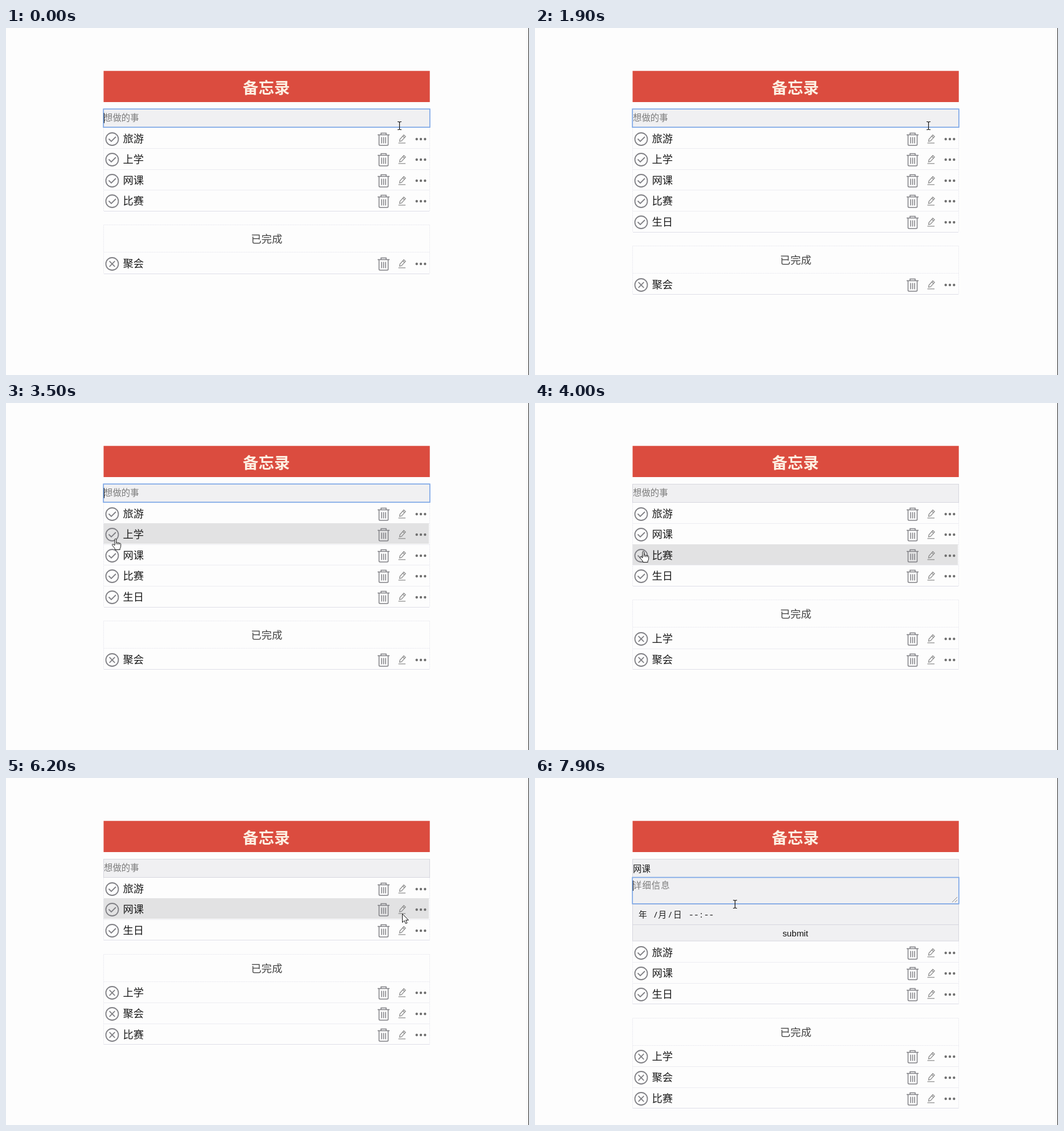
These frames come from a looping animation (919 px wide and 609 px high, 8000 ms). An HTML page:

```html
<!DOCTYPE html>
<html lang="zh-CN">
<head>
<meta charset="utf-8">
<title>备忘录</title>
<style>
  html, body { margin: 0; width: 100%; height: 100%; overflow: hidden; background: #fdfdfd; }
  svg { display: block; width: 919px; height: 609px; }
  text { font-family: "Noto Sans CJK SC", "Noto Sans CJK", "Noto Sans", sans-serif; white-space: pre; }
  .title { font-size: 27.6px; font-weight: 700; fill: #fdf0e2; text-anchor: middle; }
  .item { font-size: 18.4px; font-weight: 350; fill: #1c1c1c; }
  .done { font-size: 18.4px; font-weight: 350; fill: #444; text-anchor: middle; }
  .field { font-size: 15.4px; font-weight: 350; fill: #1c1c1c; }
  .hint { fill: #7c7c7c; }
  .mono { font-family: "Noto Sans Mono", "Noto Sans CJK SC", monospace; font-size: 14.8px; }
  .button { font-family: "Liberation Sans", sans-serif; font-size: 15.3px; fill: #111; text-anchor: middle; }
  .box { fill: #f0f0f2; stroke: #d6d6de; }
  .focus { fill: none; stroke: #7ba6e6; stroke-width: 1.7; }
  .rule { fill: none; stroke: #ececf1; stroke-width: 1; }
  .end { stroke: #dedee8; }
  .frame { fill: none; stroke: #e8e8ef; stroke-dasharray: 2 1; }
  .icon { fill: none; stroke: #7f7f84; stroke-width: 1.8; }
  .thin { fill: none; stroke: #8a8a8a; stroke-width: 1.3; }
  .caret { stroke: #111; stroke-width: 1; }
  .pointer { fill: #fff; stroke: #111; stroke-width: 1; stroke-linejoin: round; }
  .beam { fill: none; stroke: #111; stroke-width: 1.2; }
</style>
</head>
<body>
<svg viewBox="0 0 919 609" xmlns="http://www.w3.org/2000/svg">
  <defs>
    <g id="ring"><circle class="icon" cx="186.5" cy="20" r="11"/></g>
    <path id="check" class="icon" d="M180.5 19.5L185 24L193 16"/>
    <path id="cross" class="icon" d="M181.7 15.2L191.3 24.8M191.3 15.2L181.7 24.8"/>
    <g id="tools">
      <path class="icon" style="stroke-width:1.5" d="M653 12.5H674M659 12.5V9.5H668V12.5M655.5 13V29.5Q655.5 31 657.5 31H669.5Q671.5 31 671.5 29.5V13M660 16.5V27.5M663.5 16.5V27.5M667 16.5V27.5"/>
      <path class="thin" d="M691.5 24L692.2 20.3L699 12.8L702 15.6L695 23.2ZM697.2 14.8L700.2 17.6M689.5 26.8H702"/>
      <g fill="#707070">
        <circle cx="721.7" cy="20" r="2.2"/>
        <circle cx="729" cy="20" r="2.2"/>
        <circle cx="736.3" cy="20" r="2.2"/>
      </g>
    </g>
    <path id="arrow" class="pointer" d="M.5 .5V15.5L4 12.3L6.4 17.6L8.8 16.5L6.5 11.4H11.2Z"/>
    <path id="hand" class="pointer" d="M0 1.2Q1.4 -.8 2.8 1.2V7.2Q4.3 5.9 5.5 7.5Q7 6.5 8.1 8.2Q10.2 7.4 10.7 9.5V13.5Q10.5 16 9.2 17.2V19.5H.6V17.8L-4.4 11.6Q-4.6 9.2 -2.2 10L0 12ZM2.8 7.2V10M5.5 7.5V10.3M8.1 8.2V10.6"/>
    <path id="beam" class="beam" d="M-3 -6.5H-.8L.5 -5.5L1.8 -6.5H4M.5 -5.5V6.5M-3 7.5H-.8L.5 6.5L1.8 7.5H4"/>
  </defs>
  <rect width="919" height="609" fill="#fdfdfd"/>
  <rect x="171.5" y="75.3" width="573.2" height="54.7" fill="#db4c3f"/>
  <text class="title" x="457.5" y="114.5">备忘录</text>
  <g id="scene"></g>
  <path id="caret" class="caret"/>
  <use id="pointer"/>
  <rect x="918" width="1" height="609" fill="#222"/>
</svg>
<script>
const LOOP = 8000, STEP = 100, ROW = 36.6;
const ADD = 1400, FIRST = 3700, SECOND = 4600, EDIT = 6300, DETAIL = 6900;

// time, x, y of the pointer's hot spot
const path = [
  [2300, 691, 171], [2500, 610, 212], [2700, 350, 268], [2850, 220, 262], [3000, 191, 238],
  [3700, 191, 238], [4000, 189, 260], [4600, 189, 261], [4800, 300, 256],
  [5200, 648, 231], [5400, 692, 231], [5700, 730, 229], [5900, 697, 237],
  [6100, 696, 238], [6400, 696, 238], [6800, 351, 221]
];
const typing = [
  [100, "s"], [200, "sh"], [300, "she"], [400, "shen"], [500, "sheng"],
  [800, "sheng'r"], [900, "sheng'ri"], [1200, "生日"], [ADD, ""]
];

const $ = id => document.getElementById(id);
const scene = $("scene"), caret = $("caret"), pointer = $("pointer");
const label = (cls, x, y, s, id = "") => `<text ${id && `id="${id}"`} class="${cls}" x="${x}" y="${y}">${s}</text>`;
const rect = (cls, y, h, x = 171.5, w = 573) => `<rect class="${cls}" x="${x}" y="${y}" width="${w}" height="${h}"/>`;
const rule = (y, cls = "") => `<path class="rule ${cls}" d="M172 ${y}H744"/>`;

function pointerAt(t) {
  const i = path.findIndex(k => k[0] > t);
  if (i === 0) return path[0].slice(1);
  if (i < 0) return path[path.length - 1].slice(1);
  const [a, x, y] = path[i - 1], [b, u, v] = path[i];
  const p = (t - a) / (b - a);
  return [x + (u - x) * p, y + (v - y) * p];
}

function lists(t) {
  if (t < ADD) return [["旅游", "上学", "网课", "比赛"], ["聚会"]];
  if (t < FIRST) return [["旅游", "上学", "网课", "比赛", "生日"], ["聚会"]];
  if (t < SECOND) return [["旅游", "网课", "比赛", "生日"], ["上学", "聚会"]];
  return [["旅游", "网课", "生日"], ["上学", "聚会", "比赛"]];
}

function rows(names, top, mark, hover) {
  const end = top + ROW * names.length;
  const body = names.map((name, i) => {
    const y = Math.floor(top + ROW * i);
    const back = i === hover ? `<rect x="171" y="${y}" width="572" height="36" fill="#e2e2e3"/>` : "";
    const icons = ["ring", mark, "tools"].map(id => `<use href="#${id}" y="${y}"/>`).join("");
    return back + icons + label("item", 205.4, y + 26, name) +
      rule(Math.floor(top + ROW * (i + 1)) + .5, i === names.length - 1 ? "end" : "");
  }).join("");
  return body + `<path class="frame" d="M171.5 ${top}V${end}M744.5 ${top}V${end}"/>`;
}

function entry(text, composing, focused) {
  return rect("box", 142.5, 32) +
    (text ? label("field", 172, 164, text, "typed") : label("field hint", 172, 162.5, "想做的事")) +
    (composing ? '<path id="under" class="caret"/>' : "") +
    (focused ? rect("focus", 142.2, 32, 171.2, 573.6) : "");
}

function form(focused) {
  const date = [[182, "年"], [207.5, "/"], [216.5, "月"], [233, "/"], [243, "日"], [270, "--:--"]];
  return rect("box", 142.5, 32) + label("field", 172, 164.5, "网课") +
    rect("box", 174.5, 46.5) +
    `<text class="field hint" x="172" y="194" letter-spacing="1">详细信息</text>` +
    '<path class="thin" style="stroke-width:1" d="M733 218L742 209M738 218L742 214"/>' +
    rect("box", 221.5, 36) + date.map(([x, s]) => label("field mono", x, 244.5, s)).join("") +
    rect("box", 257.5, 28.5) + label("button", 457.5, 277.5, "submit") +
    (focused ? rect("focus", 174.5, 46.3, 171.2, 573.6) : "");
}

function caretOn(t) {
  if (t < ADD) return true;
  if (t < FIRST) return t < 1900 || (t >= 2400 && t < 3000) || t >= 3500;
  return t >= DETAIL && (t < 7400 || t >= 7900);
}

let last = "";
function draw(time) {
  const t = Math.floor(time % LOOP / STEP) * STEP;
  const [x, y] = pointerAt(t), open = t >= EDIT;
  const [todo, done] = lists(t), top = open ? 287 : 175;
  const row = Math.floor((y - top) / ROW);
  const hover = row >= 0 && row < todo.length ? row : -1;
  const text = typing.reduce((s, k) => t >= k[0] ? k[1] : s, "");
  const composing = text !== "" && t < 1200;
  const doneTop = top + ROW * todo.length + 24.5;

  const html = (open ? form(t >= DETAIL) : entry(text, composing, t < FIRST)) +
    rows(todo, top, "check", hover) +
    rect("frame", Math.floor(doneTop) + .5, 48) +
    label("done", 458, Math.floor(doneTop) + 32, "已完成") +
    rows(done, doneTop + 48.5, "cross", -1);
  if (html !== last) scene.innerHTML = last = html;

  const width = text ? Math.round($("typed").getComputedTextLength()) : 0;
  if (composing) $("under").setAttribute("d", `M172 167.5h${width}`);
  caret.setAttribute("d", `M${172.5 + width} ${open ? 180 : 149}v18`);
  caret.setAttribute("visibility", caretOn(t) ? "visible" : "hidden");

  const overText = y < 175 || (open && y < 222);
  const overRing = hover >= 0 && x < 199;
  pointer.setAttribute("href", overText ? "#beam" : overRing ? "#hand" : "#arrow");
  pointer.setAttribute("transform", `translate(${Math.round(x)} ${Math.round(y)})`);
}

let start = null;
function tick(now) {
  if (start === null) start = now;
  draw(now - start);
  requestAnimationFrame(tick);
}
draw(0);
requestAnimationFrame(tick);
</script>
</body>
</html>
```
